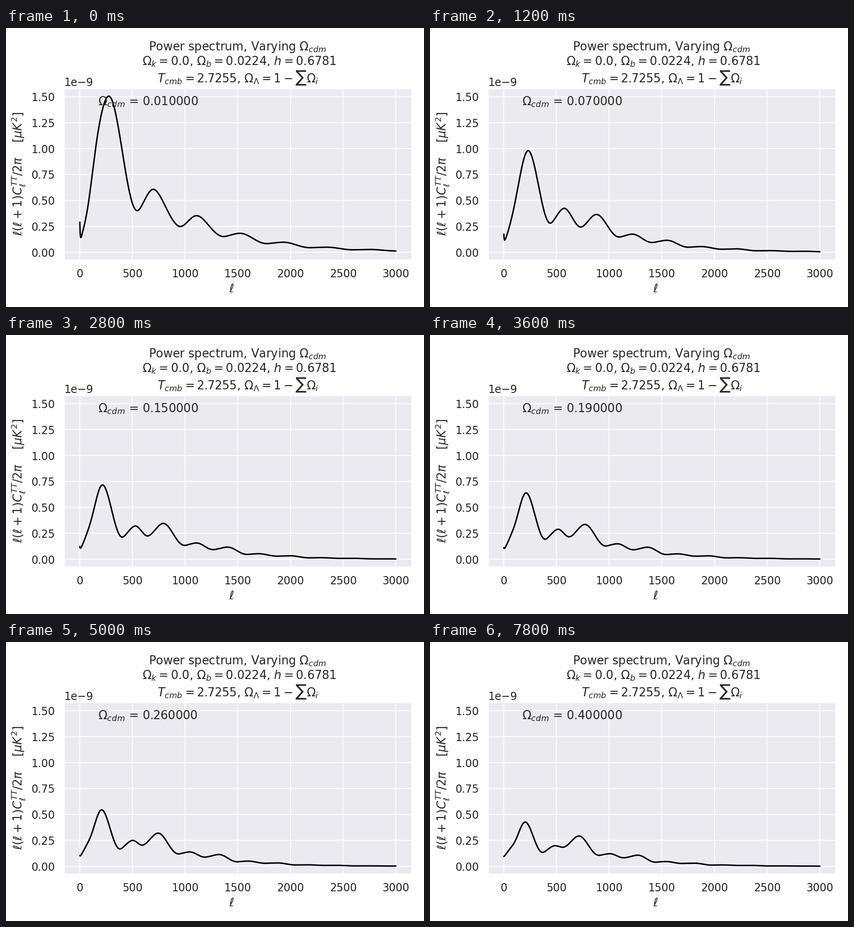
Recreate the animation shown at these times as a matplotlib script. Size 917 by 611 pixels, loop 8000 ms.

```python
import numpy as np
import matplotlib.pyplot as plt
from matplotlib.animation import FuncAnimation

W, H, DPI = 917, 611, 128
FRAMES, INTERVAL = 40, 200
LABEL, TICK = 25.6, 23.5  # font sizes in pixels
INK = "0.15"
PEAKS = 13
START, SHOULDER = 2, 99   # multipoles where the first rise begins and steepens
OMEGA_B, OMEGA_MIN, OMEGA_MAX = 0.0224, 0.01, 0.40


def pt(px):
    return px * 72 / DPI


def density(omega):
    """Log of the total matter density, zero at the first value shown."""
    return np.log((omega + OMEGA_B) / (OMEGA_MIN + OMEGA_B))


def peak_series(*first):
    """Continue the leading peak heights with geometric damping."""
    p = list(first)
    while len(p) < PEAKS:
        p.append(0.28 * p[-2])
    return np.log(p)


LOW_MATTER = peak_series(1.506, 0.607, 0.353, 0.183, 0.097, 0.049)
HIGH_MATTER = peak_series(0.4265, 0.1985, 0.292, 0.1213, 0.107, 0.0455)


def extrema(u):
    """Multipoles and heights of the alternating peaks and troughs."""
    n = np.arange(1, PEAKS + 1)
    parity = (-1.0) ** n
    even = parity > 0
    spacing = 410.4 * np.exp(-0.249 * u + 0.0322 * u**2)

    peak_x = (n - 0.305 + 0.015 * u
              + 0.04 * u * parity * np.exp(-(n - 2.5) ** 2)
              + (0.023 * u - 0.031) * np.exp(-3 * (n - 1)))
    trough_x = n + 0.32 + 0.018 * u - 0.26 * u * even * np.exp(-0.42 * n)

    u_max = density(OMEGA_MAX)
    peak_y = np.exp(LOW_MATTER + (HIGH_MATTER - LOW_MATTER) * u / u_max
                    + (0.045 + 0.008 * n) * u * (u_max - u))
    depth = ((0.66 - 0.47 * np.exp(-0.67 * n))
             * np.exp(u * (0.05 * parity + 0.1 * np.exp(-0.6 * (n - 1.5) ** 2))))
    trough_y = depth[:-1] * np.sqrt(peak_y[:-1] * peak_y[1:])

    x, y = np.empty(2 * PEAKS - 1), np.empty(2 * PEAKS - 1)
    x[::2], x[1::2] = peak_x, trough_x[:-1]
    y[::2], y[1::2] = peak_y, trough_y
    return 4 + spacing * x, y


def smooth_curve(x, xk, yk, mk):
    """Quintic Hermite curve with curvatures averaged from the cubic one."""
    d, h = np.diff(xk), np.diff(yk)
    left = (6 * h / d - 4 * mk[:-1] - 2 * mk[1:]) / d
    right = (-6 * h / d + 2 * mk[:-1] + 4 * mk[1:]) / d
    ck = np.concatenate(([left[0]], (left[1:] + right[:-1]) / 2, [right[-1]]))

    i = np.clip(np.searchsorted(xk, x, side="right") - 1, 0, len(d) - 1)
    w = d[i]
    t = (x - xk[i]) / w
    s = 1 - t
    step = t**3 * (10 - 15 * t + 6 * t**2)
    return (yk[i] + h[i] * step
            + w * mk[i] * (t - 6 * t**3 + 8 * t**4 - 3 * t**5)
            + w * mk[i + 1] * (-4 * t**3 + 7 * t**4 - 3 * t**5)
            + w**2 / 2 * (ck[i] * t**2 * s**3 + ck[i + 1] * t**3 * s**2))


def spectrum(ell, omega):
    u = density(omega)
    x, y = extrema(u)
    xk = np.concatenate(([START, SHOULDER], x))
    yk = np.concatenate(([0.09, y[0] * (0.39 + 0.052 * u)], y))
    mk = np.zeros_like(xk)
    mk[0] = 0.0013 + 0.0028 * np.exp(-1.1 * u)
    mk[1] = y[0] * (0.0051 - 0.00016 * u**2)
    spike = 0.2 * np.exp(-0.4 * u - 0.407 * u**2)
    return smooth_curve(ell, xk, yk, mk) + spike * np.exp((START - ell) / 3.5)


plt.rcParams.update({
    "font.family": "DejaVu Sans", "mathtext.fontset": "dejavusans",
    "text.color": INK, "xtick.labelsize": pt(TICK), "ytick.labelsize": pt(TICK),
})

fig = plt.figure(figsize=(W / DPI, H / DPI), dpi=DPI, facecolor="white")
left, right, top, bottom = 127.3, 889.9, 132.0, 507.5
ax = fig.add_axes([left / W, 1 - bottom / H, (right - left) / W, (bottom - top) / H],
                  facecolor="#eaeaf0")
ax.set_axisbelow(True)
ax.grid(color="white", lw=pt(2.1))
ax.tick_params(length=0, pad=pt(19.8), labelcolor=INK)
ax.yaxis.get_offset_text().set_color(INK)
for spine in ax.spines.values():
    spine.set(color="white", linewidth=pt(2.65))

ell = np.arange(START, 3001)
margin = 0.05 * (ell[-1] - ell[0])
ax.set_xlim(ell[0] - margin, ell[-1] + margin)
ax.set_ylim(-0.072e-9, 1.5813e-9)
for grid_line in ax.get_xgridlines() + ax.get_ygridlines():
    grid_line.set_snap(False)


def label(x, y, text, **kw):
    return fig.text(x / W, 1 - y / H, text, size=pt(LABEL), ha="center",
                    va="baseline", **kw)


mid = (left + right) / 2
label(mid - 1, 49, r"Power spectrum, Varying $\Omega_{cdm}$")
label(mid + 3.5, 81, r"$\Omega_k = 0.0$, $\Omega_b = 0.0224$, $h = 0.6781$")
label(mid, 118.5, r"$T_{cmb} = 2.7255$, $\Omega_\Lambda = 1 - \sum\Omega_i$")
label(495, 579, r"$\ell$")
label(36, (top + bottom) / 2, r"$\ell(\ell+1)C_\ell^{TT}/2\pi\quad$ [$\mu K^2$]",
      rotation=90, rotation_mode="anchor")

line, = ax.plot([], [], color="black", lw=pt(3.15), solid_capstyle="round")
note = ax.text(0.098, 0.9, "", transform=ax.transAxes, size=pt(LABEL))


def update(i):
    omega = OMEGA_MIN * (i + 1)
    line.set_data(ell, spectrum(ell, omega) * 1e-9)
    note.set_text(r"$\Omega_{cdm}$ = %f" % omega)
    return line, note


anim = FuncAnimation(fig, update, frames=FRAMES, interval=INTERVAL,
                     repeat=True, repeat_delay=0)
plt.show()
```
